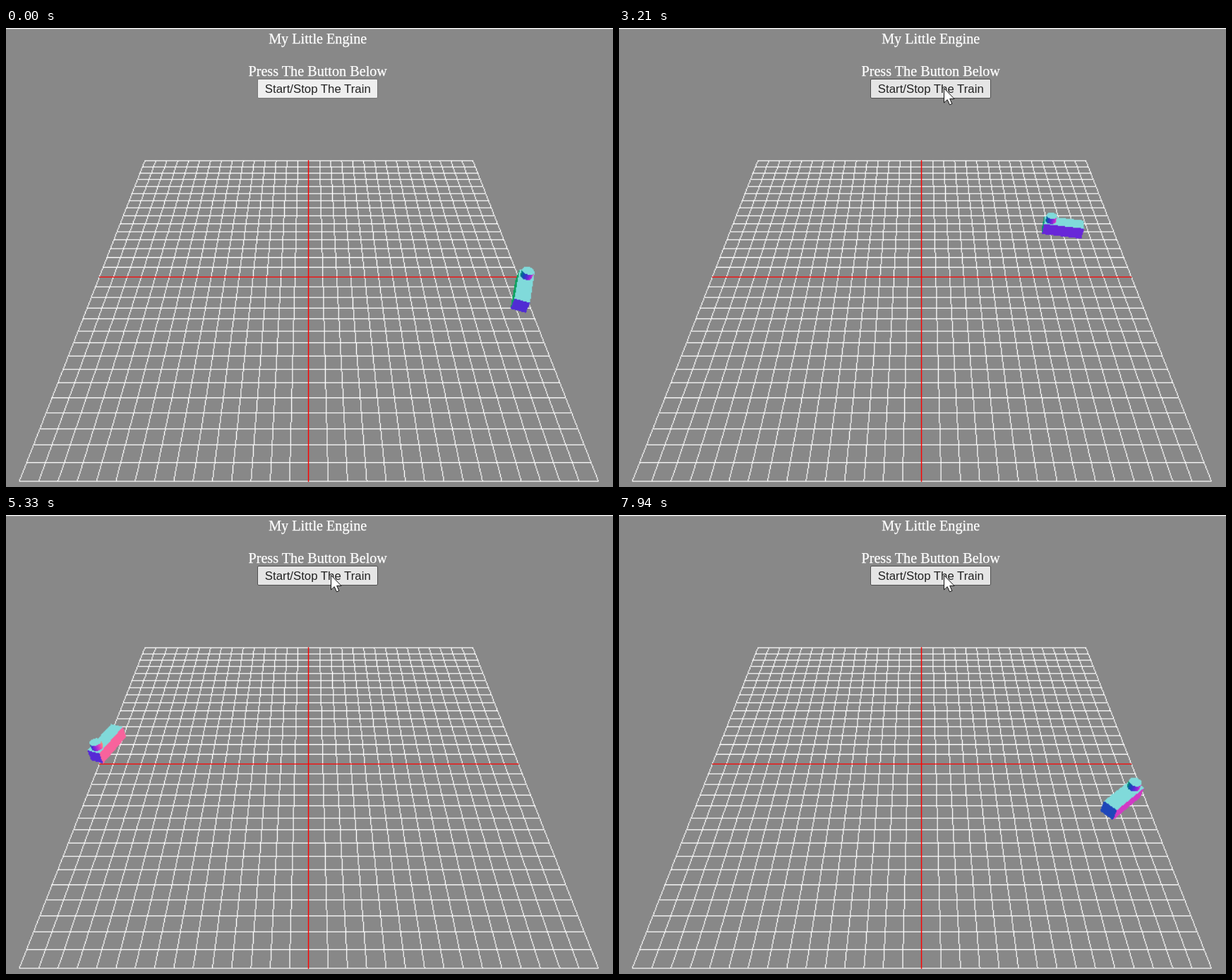
An HTML page with a canvas that plays this animation: 860x651 px, repeating every 8 s.

```html
<!DOCTYPE html>
<html lang="en">
<head>
<meta charset="utf-8">
<title>My Little Engine</title>
<style>
  html, body { margin: 0; width: 100%; height: 100%; overflow: hidden; background: #888; }
  #stage { position: relative; width: 860px; height: 651px; overflow: hidden; background: #888; }
  canvas, svg { position: absolute; left: 0; top: 0; }
  canvas { left: 0.7px; top: -0.2px; width: 860.58px; height: 651.42px; }
  .serif { font: 20.2px "Liberation Serif", serif; fill: #fff; stroke: #fff; stroke-width: 0.25; text-anchor: middle; }
  .label { font: 16.8px "Liberation Sans", sans-serif; fill: #222; text-anchor: middle; }
</style>
</head>
<body>
<div id="stage">
  <canvas id="grid" width="683" height="517"></canvas>
  <canvas id="train" width="683" height="517"></canvas>
  <svg width="860" height="651">
    <rect width="860" height="1.3" fill="#fff"/>
    <text class="serif" x="441.7" y="22">My Little Engine</text>
    <text class="serif" x="441.7" y="68">Press The Button Below</text>
    <rect id="button" x="356.5" y="72.5" width="170" height="27" rx="1.5"/>
    <text class="label" x="441.8" y="92">Start/Stop The Train</text>
    <path id="cursor" d="M0 0V20.5L4.7 16.2 8 23.4 11.4 22 8.2 14.9H14.5Z" fill="#fff" stroke="#111"/>
  </svg>
</div>
<script>
const LOOP = 8000, STEP = 77.4, START = 2360;
const SCALE = 1.26, CX = 339.99, CY = 280.01;  // screen size of a canvas pixel, view centre
const K = Math.SQRT1_2, FOCAL = 758.3 / SCALE, DIST = 38.316;
const HALF_X = 10, R = 5, ARC = Math.PI * R, HALF_LAP = 2 * HALF_X + ARC;

const $ = id => document.getElementById(id);
const gridCtx = $('grid').getContext('2d');
const trainCtx = $('train').getContext('2d');

// Camera sits at 45 degrees and looks at the origin.
function project([x, y, z]) {
  const s = FOCAL / (DIST - (y + z) * K);
  return [CX + s * x, CY - s * (y - z) * K];
}

// Hard-edged line and convex polygon, without antialiasing.
function line(a, b, color) {
  const [x0, y0] = project(a), [x1, y1] = project(b);
  const n = Math.ceil(Math.max(Math.abs(x1 - x0), Math.abs(y1 - y0)));
  gridCtx.fillStyle = color;
  for (let i = 0; i <= n; i++) {
    gridCtx.fillRect(Math.floor(x0 + (x1 - x0) * i / n), Math.floor(y0 + (y1 - y0) * i / n), 1, 1);
  }
}

function polygon(points, color) {
  const p = points.map(project), ys = p.map(q => q[1]);
  trainCtx.fillStyle = color;
  for (let y = Math.floor(Math.min(...ys)); y <= Math.max(...ys); y++) {
    const row = y + 0.5, xs = [];
    p.forEach((a, i) => {
      const b = p[(i + 1) % p.length];
      if ((a[1] <= row) !== (b[1] <= row)) {
        xs.push(a[0] + (b[0] - a[0]) * (row - a[1]) / (b[1] - a[1]));
      }
    });
    if (xs.length < 2) continue;
    const left = Math.round(Math.min(...xs)), right = Math.round(Math.max(...xs));
    trainCtx.fillRect(left, y, right - left, 1);
  }
}

function drawGrid() {
  for (let i = -15; i <= 15; i++) {
    line([-15, 0, i], [15, 0, i], '#fff');
    line([i, 0, -15], [i, 0, 15], '#fff');
  }
  line([-15, 0, 0], [15, 0, 0], '#f00');
  line([0, 0, -15], [0, 0, 15], '#f00');
}

// Track: two straights joined by half circles; the second half mirrors the first.
function pose(u) {
  const half = Math.floor(u / HALF_LAP), d = u - half * HALF_LAP;
  const sign = half % 2 ? -1 : 1;
  const turn = Math.max(0, d - 2 * HALF_X) / R;
  const x = Math.min(d, 2 * HALF_X) - HALF_X + R * Math.sin(turn);
  return { x: sign * x, z: sign * R * Math.cos(turn), angle: turn + half * Math.PI };
}

function drawTrain(u) {
  const { x, z, angle } = pose(u), c = Math.cos(angle), s = Math.sin(angle);
  const rotate = ([l, y, w]) => [l * c + w * s, y, w * c - l * s];
  const place = v => { const r = rotate(v); return [r[0] + x, r[1], r[2] + z]; };
  const eye = [0, DIST * K, DIST * K];

  // Colour follows the normal as seen from the camera; back faces are skipped.
  function face(normal, corners) {
    const n = rotate(normal), p = corners.map(place);
    if (n.reduce((sum, v, i) => sum + v * (eye[i] - p[0][i]), 0) <= 0) return;
    const view = [n[0], (n[1] - n[2]) * K, (n[1] + n[2]) * K];
    polygon(p, `rgb(${view.map(v => Math.round(127.5 + 127.5 * v))})`);
  }

  trainCtx.clearRect(0, 0, 683, 517);
  for (const e of [-1, 1]) {
    const l = 1.5 * e, w = 0.5 * e;
    face([e, 0, 0], [[l, 0, -0.5], [l, 0, 0.5], [l, 1, 0.5], [l, 1, -0.5]]);
    face([0, 0, e], [[-1.5, 0, w], [1.5, 0, w], [1.5, 1, w], [-1.5, 1, w]]);
  }
  face([0, 1, 0], [[-1.5, 1, -0.5], [1.5, 1, -0.5], [1.5, 1, 0.5], [-1.5, 1, 0.5]]);

  const SEG = 24, lid = [];
  const rim = (i, y) => {
    const a = i / SEG * 2 * Math.PI;
    return [1 + 0.4 * Math.cos(a), y, 0.4 * Math.sin(a)];
  };
  for (let i = 0; i < SEG; i++) {
    const a = (i + 0.5) / SEG * 2 * Math.PI;
    face([Math.cos(a), 0, Math.sin(a)], [rim(i, 1), rim(i + 1, 1), rim(i + 1, 1.5), rim(i, 1.5)]);
    lid.push(rim(i, 1.5));
  }
  face([0, 1, 0], lid);
}

// Pointer: time, x, y
const PATH = [
  [200, 791, 557], [520, 780, 537], [1130, 780, 537], [1720, 455, 51], [1830, 455, 51],
  [1920, 457, 45], [2200, 462, 62], [2340, 462, 70], [2440, 462, 77], [2760, 462, 77],
  [3000, 460, 85], [LOOP, 460, 85]
];

function drawPointer(t) {
  const i = Math.max(1, PATH.findIndex(k => k[0] >= t));
  const a = PATH[i - 1], b = PATH[i];
  const f = Math.max(0, (t - a[0]) / (b[0] - a[0])), e = f * f * (3 - 2 * f);
  const at = j => a[j] + (b[j] - a[j]) * e;
  $('cursor').setAttribute('transform', `translate(${at(1) + 0.5} ${at(2) + 0.5})`);
}

function drawButton(t) {
  const [fill, edge] = t < 2130 ? ['#efefef', '#767676']
    : t >= START && t < START + STEP ? ['#f5f5f5', '#8d8d8d'] : ['#e5e5e5', '#4f4f4f'];
  $('button').setAttribute('fill', fill);
  $('button').setAttribute('stroke', edge);
}

let shown = null;
function tick(now) {
  const t = now % LOOP, n = Math.floor((t - START) / STEP);
  $('cursor').style.display = t < 200 ? 'none' : '';
  drawButton(t);
  if (n !== shown) {
    shown = n;
    drawPointer(Math.min(LOOP, START + (n + 0.5) * STEP));
    drawTrain(Math.max(25.95, 28.97 + 0.9695 * (n - 4)));
  }
  requestAnimationFrame(tick);
}

drawGrid();
tick(0);
</script>
</body>
</html>
```
